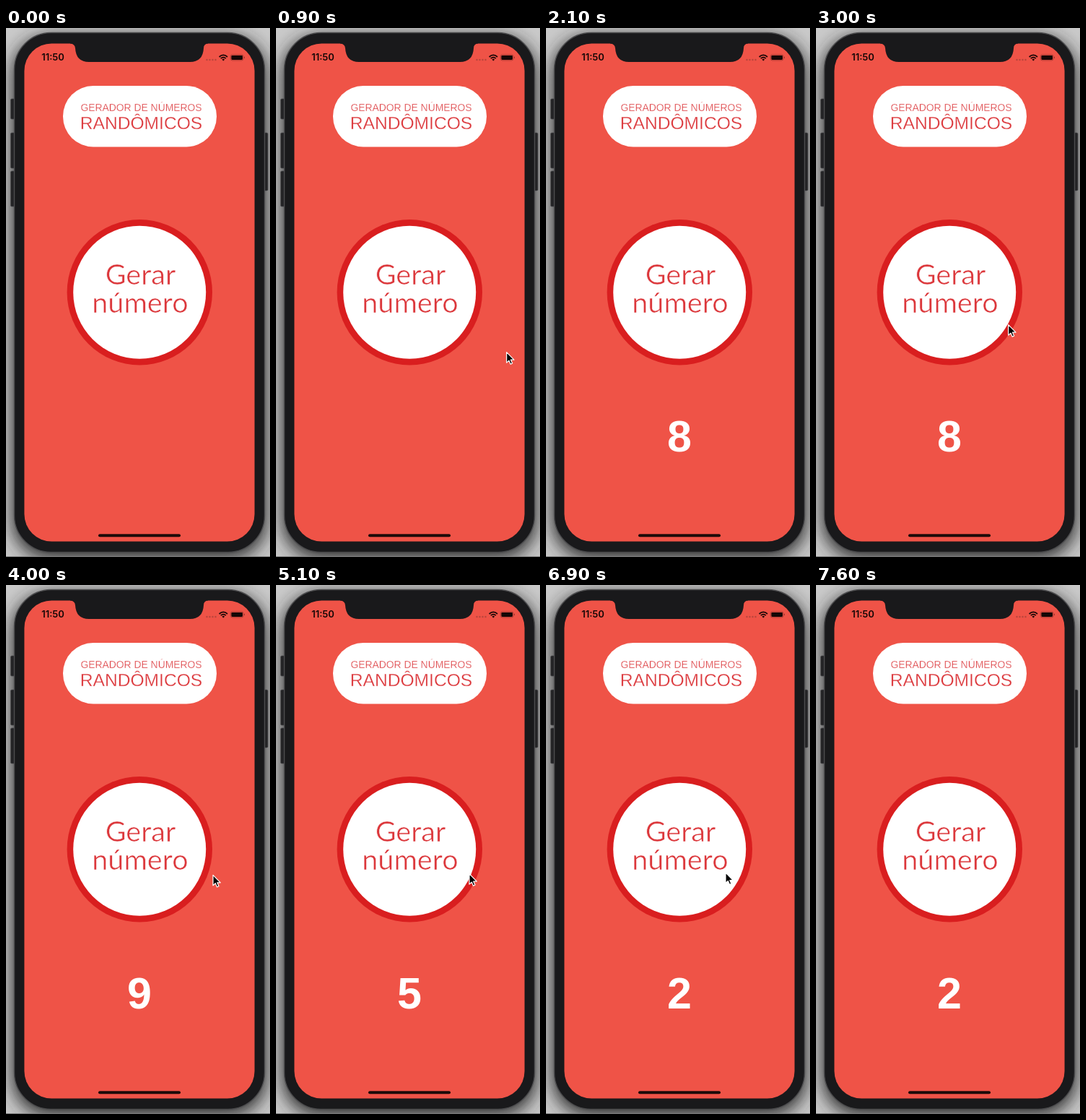
Write an HTML page that moves like this. It is 366 px wide and 732 px high and loops after 8.7 s.

```html
<!DOCTYPE html>
<html lang="pt">
<head>
<meta charset="utf-8">
<title>Gerador de números</title>
<style>
  html, body { margin: 0; width: 100%; height: 100%; overflow: hidden; background: #c4c4c4; }
  svg { display: block; width: 100vw; height: 100vh; }
  text { text-anchor: middle; fill: #dc383c; }
  .clock { font: 600 13px Inter, sans-serif; fill: #160706; }
  .title { font-family: "Liberation Sans", Arial, sans-serif; }
  .label { font: 39.5px Lato, sans-serif; }
  .number { font: bold 61px "Liberation Sans", Arial, sans-serif; fill: #fff; }
  /* A white outline thins the letters to a lighter weight */
  .title { stroke: #fff; stroke-width: .3px; }
  .label { stroke: #fff; stroke-width: .7px; }
</style>
</head>
<body>
<svg viewBox="0 0 366 732">
  <defs>
    <filter id="blur" x="-20%" y="-20%" width="140%" height="140%">
      <feGaussianBlur stdDeviation="12"/>
    </filter>
    <radialGradient id="dent" cx=".535" cy=".55" r=".565">
      <stop offset=".86" stop-color="#fff"/>
      <stop offset="1" stop-color="#c4c4c4"/>
    </radialGradient>
  </defs>

  <!-- Phone -->
  <rect width="366" height="732" fill="#cacaca"/>
  <rect x="9" y="12" width="352" height="722" rx="52" fill="#2c2c2c" filter="url(#blur)"/>
  <rect y="731" width="366" height="1" fill="#777"/>
  <g fill="#242426" stroke="#4a4a4c" stroke-width=".7">
    <rect x="6.5" y="98" width="8" height="28" rx="1.5"/>
    <rect x="6.5" y="145" width="8" height="49" rx="1.5"/>
    <rect x="6.5" y="198" width="8" height="49" rx="1.5"/>
    <rect x="355" y="145" width="8" height="80" rx="1.5"/>
  </g>
  <rect x="11.5" y="6.5" width="347" height="719" rx="51" fill="#19191b" stroke="#4c4c4e" stroke-width="1.4"/>
  <rect x="25.4" y="21.4" width="319.2" height="689.2" rx="38" fill="#ef5347"/>
  <path d="M89 20V21.5Q95.5 22 96 28Q97 47 115 47H255Q273 47 274 28Q274 22 280 21.5V20Z" fill="#19191b"/>

  <!-- Status bar -->
  <text class="clock" x="65" y="45">11:50</text>
  <path d="M278.5 44H291" stroke="#b8453c" stroke-width="2.4" stroke-linecap="round" stroke-dasharray="0 4"/>
  <g fill="none" stroke="#160706" stroke-width="1.7">
    <path d="M295.6 40Q301.3 34.8 307 40"/>
    <path d="M297.8 42.2Q301.3 39 304.8 42.2"/>
  </g>
  <path d="M299.4 43.5Q301.3 42.2 303.2 43.5L301.3 45.5Z" fill="#160706"/>
  <rect x="311.4" y="36.9" width="17.6" height="8" rx="2.3" fill="none" stroke="#9c372f" stroke-width=".8"/>
  <rect x="312.4" y="37.9" width="15.6" height="6" rx="1.3" fill="#160706"/>
  <path d="M330 39.5Q332 40.9 330 42.3Z" fill="#8a3029"/>

  <!-- App -->
  <rect x="79" y="80" width="213" height="84.5" rx="42" fill="#fff"/>
  <text class="title" x="187.5" y="115" font-size="13.9">GERADOR DE NÚMEROS</text>
  <text class="title" x="187.5" y="140" font-size="24.6">RANDÔMICOS</text>
  <circle cx="185.3" cy="365.7" r="100.7" fill="#d91e1f"/>
  <circle id="face" cx="185.2" cy="365.7"/>
  <text class="label" x="186.5" y="355">Gerar</text>
  <text class="label" x="186" y="393.5">número</text>
  <text class="number" id="number" x="185" y="586"></text>
  <rect x="128" y="700.3" width="114" height="4" rx="2" fill="#1c0b09"/>
  <path id="cursor" d="M0 0V14.5L3.3 11.4L5.5 16.5L8 15.4L5.8 10.5H10.3Z"
        fill="#000" stroke="#fff" stroke-width="1.2" stroke-linejoin="round"/>
</svg>
<script>
  const LOOP = 8700, STEP = 100, HOLD = 100, TRAVEL = 300;
  const byId = id => document.getElementById(id);
  const face = byId('face'), number = byId('number'), cursor = byId('cursor');

  // The pointer shows up `lead` ms before a press and moves off `stay` ms after it
  const tap = (press, digit, lead = 100, stay = 300) => ({ press, digit, lead, stay });
  const taps = [tap(1300, 8, 800), tap(3100, 9, 300, 700), tap(4700, 5), tap(6600, 2)];

  // Pointer spot on the button, and its offsets while arriving and leaving
  const spot = { x: 249, y: 398 }, arrive = { x: 53, y: 38 }, leave = { x: 57, y: 5 };

  function placeCursor(t) {
    const visit = taps.find(({ press, lead, stay }) =>
      t >= press - lead && t < press + stay + TRAVEL);
    cursor.setAttribute('visibility', visit ? 'visible' : 'hidden');
    if (!visit) return;
    const since = t - visit.press;
    const offset = since < 0 ? arrive : leave;
    const far = Math.max(-since, since - visit.stay, 0) / TRAVEL;
    cursor.setAttribute('transform',
      `translate(${spot.x + offset.x * far} ${spot.y + offset.y * far})`);
  }

  function draw(now) {
    const t = Math.floor(now % LOOP / STEP) * STEP;
    const last = taps.filter(({ press }) => t >= press).pop();
    const pressed = last && t < last.press + HOLD;
    face.setAttribute('r', pressed ? 82.9 : 92);
    face.setAttribute('fill', pressed ? 'url(#dent)' : '#fff');

    const shown = taps.filter(({ press }) => t >= press + HOLD).pop();
    number.textContent = shown ? shown.digit : '';
    placeCursor(t);
  }

  const start = performance.now();
  function tick() {
    draw(performance.now() - start);
    requestAnimationFrame(tick);
  }
  tick();
</script>
</body>
</html>
```
